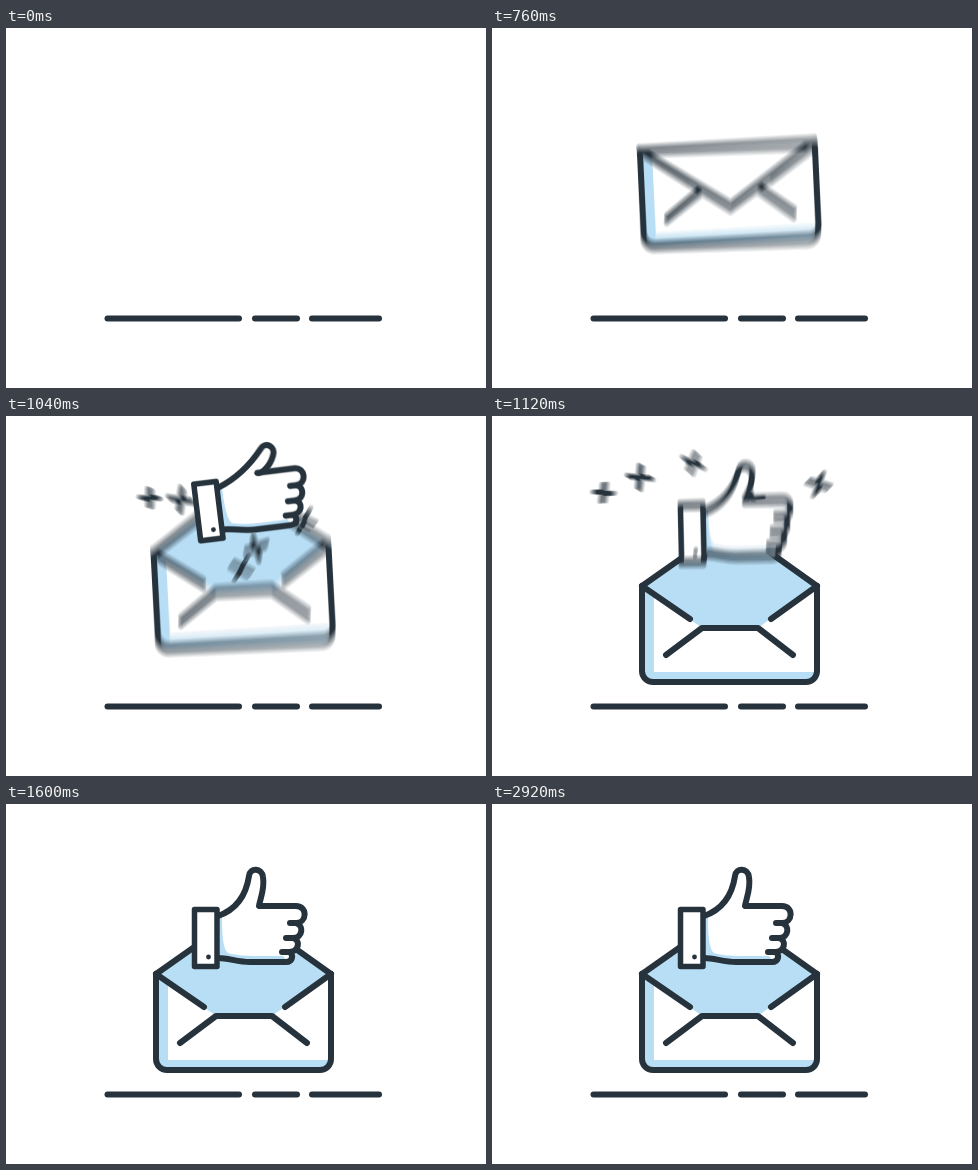
Animation of 480x360 px, one loop 3880 ms. Source, as an HTML page with a canvas:

```html
<!DOCTYPE html>
<html lang="en">
<head>
<meta charset="utf-8">
<title>Envelope with thumbs up</title>
<style>
  html, body { margin: 0; width: 100%; height: 100%; overflow: hidden; background: #fff; }
  canvas { display: block; width: 100vw; height: 100vh; }
</style>
</head>
<body>
<canvas id="stage" width="480" height="360"></canvas>
<script>
const LOOP = 3880, STEP = 40, SHUTTER = 20, SAMPLES = 16;
const INK = '#26333d', BLUE = '#b8def5', WHITE = '#fff';
const stage = document.getElementById('stage').getContext('2d');
const layer = document.createElement('canvas');
layer.width = 480;
layer.height = 360;
const c = layer.getContext('2d');

const progress = (t, from, to) => Math.min(1, Math.max(0, (t - from) / (to - from)));
const smooth = p => p * p * (3 - 2 * p);
const mix = (a, b, p) => a + (b - a) * p;
const rad = degrees => degrees * Math.PI / 180;

function trace(points) {
  c.beginPath();
  points.forEach(([x, y]) => c.lineTo(x, y));
}
function fill(color) {
  c.fillStyle = color;
  c.fill();
}
function stroke(width = 6) {
  c.strokeStyle = INK;
  c.lineWidth = width;
  c.stroke();
}
function line(...points) {
  trace(points);
  stroke();
}
function turn(x, y, degrees) {
  c.translate(x, y);
  c.rotate(rad(degrees));
  c.translate(-x, -y);
}

// The envelope is thrown up, tilts over and falls back onto the ground.
function envelopeLift(t) {
  if (t < 640) return 60 + 0.9 * (640 - t);
  return Math.min(60, t < 890 ? 60 : 0, -93 + 0.00247 * (t - 890) ** 2);
}
function envelopeTilt(t) {
  return t < 880 ? mix(9, -8, smooth(progress(t, 560, 880)))
                 : -8 * (1 - progress(t, 880, 1083) ** 2);
}
function inEnvelope(t, draw) {
  c.save();
  c.translate(0, envelopeLift(t));
  turn(238, 219, envelopeTilt(t));
  draw();
  c.restore();
}

const LEFT = [150, 170], RIGHT = [325, 170];
const POCKET = [[210, 212], [266, 212]];

function drawBack(flap) {
  if (flap > 0) {
    trace([LEFT, [238, 170 - flap], RIGHT]);
    fill(BLUE);
    stroke();
  }
  trace([LEFT, ...POCKET, RIGHT]);
  fill(BLUE);
}

function bodyPath() {
  c.beginPath();
  c.moveTo(...LEFT);
  c.arcTo(150, 266, 325, 266, 11);
  c.arcTo(325, 266, ...RIGHT, 11);
  c.lineTo(...RIGHT);
}

function drawFront(flap) {
  bodyPath();
  c.lineTo(...POCKET[1]);
  c.lineTo(...POCKET[0]);
  fill(WHITE);

  trace([[151, 172], [162, 179], [162, 256], [324, 256], [318, 265], [159, 265], [151, 257]]);
  fill(BLUE);

  bodyPath();
  stroke();
  line(LEFT, [198, 203]);
  line(RIGHT, [279, 203]);
  line([174, 239], ...POCKET, [301, 239]);

  if (flap <= 0) {
    trace([LEFT, [238, 170 - flap], RIGHT]);
    c.closePath();
    fill(WHITE);
    stroke();
  }
}

// The thumb leans clockwise about its base until the hand has unfolded.
function handPath(lean) {
  const cos = Math.cos(rad(lean)), sin = Math.sin(rad(lean));
  const bent = (x, y) => [240 + (x - 240) * cos - (y - 104) * sin,
                          104 + (x - 240) * sin + (y - 104) * cos];
  c.beginPath();
  c.moveTo(212, 112);
  c.bezierCurveTo(229, 106, ...bent(240, 92), ...bent(243, 72));
  c.bezierCurveTo(...bent(244, 63), ...bent(256, 64), ...bent(257, 73));
  c.bezierCurveTo(...bent(259, 85), ...bent(254, 95), 253, 102);
  c.lineTo(290, 102);
  c.bezierCurveTo(302, 102, 301, 119, 290, 119);
  c.lineTo(284, 119);
  c.lineTo(290, 119);
  c.bezierCurveTo(298, 121, 297, 134, 287, 134);
  c.lineTo(280, 134);
  c.lineTo(287, 134);
  c.bezierCurveTo(295, 136, 293, 148, 283, 148);
  c.lineTo(276, 148);
  c.lineTo(283, 148);
  c.bezierCurveTo(288, 150, 287, 158, 280, 158);
  c.lineTo(244, 158);
  c.bezierCurveTo(232, 158, 222, 154, 212, 154);
}

function drawFist(t) {
  const folded = 1 - progress(t, 920, 1035);
  const lean = t < 1040 ? mix(62, 32, progress(t, 920, 1040))
                        : mix(32, 0, progress(t, 1040, 1145));
  c.save();
  c.translate(212, 130);
  c.rotate(rad(-12 * folded));
  c.scale(1 - 0.2 * folded, 1);
  c.translate(-212, -130);
  handPath(lean);
  fill(WHITE);
  c.beginPath();
  c.moveTo(213, 112);
  c.lineTo(216, 111);
  c.bezierCurveTo(216, 130, 217, 145, 222, 149);
  c.bezierCurveTo(235, 153, 255, 152, 277, 152);
  c.lineTo(281, 157);
  c.lineTo(240, 157);
  c.lineTo(213, 153);
  fill(BLUE);
  handPath(lean);
  stroke();
  c.restore();
}

function drawHand(t) {
  if (t < 870) return;
  c.save();
  inEnvelope(t, () => trace([[150, -200], [325, -200], RIGHT, POCKET[1], POCKET[0], LEFT]));
  c.clip();

  const lift = 0.0028 * (t - 1030) ** 2 - 39;
  c.translate(0, t < 1030 ? lift : Math.min(0, lift));
  turn(199, 112, -7 * (1 - smooth(progress(t, 1040, 1150))));
  drawFist(t);

  c.beginPath();
  c.rect(188.5, 105.5, 22.5, 57);
  fill(WHITE);
  stroke(5.5);
  c.beginPath();
  c.arc(202.5, 153, 2.4, 0, 2 * Math.PI);
  fill(INK);
  c.restore();
}

// Position at 1040 ms, position at 1280 ms, size, first angle, spin, time of vanishing.
const SPARKS = [
  [144, 82, 47, 110, 17, 0, 18, 1335],
  [175, 84, 94, 60, 22, 8, -8, 1440],
  [235, 85, 134, 15, 18, 10, 35, 1320],
  [250, 132, 279, 38, 22, -20, 32, 1600],
  [298, 105, 384, 39, 20, 25, -22, 1480],
  [235, 153, 327, 75, 20, 28, -30, 1500]
];

function drawSparks(t) {
  if (t < 985) return;
  const u = (t - 1040) / 240;
  const gravity = 66 * u * (u - 1);
  const scale = progress(t, 985, 1035);
  for (const [x0, y0, x1, y1, size, angle, spin, end] of SPARKS) {
    if (t >= end) continue;
    const r = size * scale / 2;
    c.save();
    c.globalAlpha = 1 - progress(t, end - 120, end);
    c.translate(mix(x0, x1, u), mix(y0, y1, u) + gravity);
    c.rotate(rad(angle + spin * u));
    c.beginPath();
    c.moveTo(-r, 0);
    c.lineTo(r, 0);
    c.moveTo(0, -r);
    c.lineTo(0, r);
    stroke(5 * scale);
    c.restore();
  }
}

function drawScene(t) {
  c.fillStyle = WHITE;
  c.fillRect(0, 0, 480, 360);
  c.lineCap = c.lineJoin = 'round';
  if (t >= 550) {
    const flap = mix(-60, 62, smooth(progress(t, 800, 965)));
    c.save();
    c.beginPath();
    c.rect(0, 0, 480, 291);
    c.clip();
    inEnvelope(t, () => drawBack(flap));
    drawSparks(t);
    drawHand(t);
    inEnvelope(t, () => drawFront(flap));
    c.restore();
  }
  line([101.5, 290.5], [233, 290.5]);
  line([249, 290.5], [291, 290.5]);
  line([306, 290.5], [373, 290.5]);
}

// Motion blur: average several moments within the open shutter.
function render(t) {
  const samples = t >= 560 && t < 1600 ? SAMPLES : 1;
  for (let i = 0; i < samples; i++) {
    drawScene(t + SHUTTER * ((i + 0.5) / samples - 0.5));
    stage.globalAlpha = 1 / (i + 1);
    stage.drawImage(layer, 0, 0);
  }
}

let shown = -1;
function tick() {
  const t = Math.floor(performance.now() % LOOP / STEP) * STEP;
  if (t !== shown) render(shown = t);
  requestAnimationFrame(tick);
}
tick();
</script>
</body>
</html>
```
